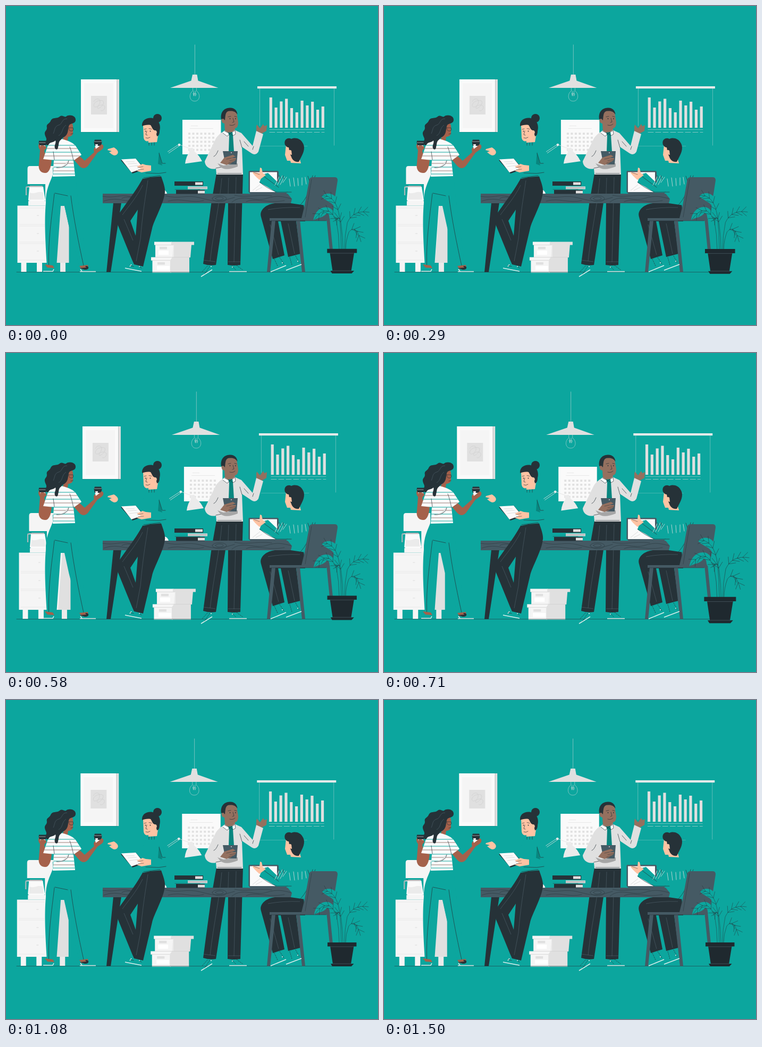
Recreate the animation shown at these times as an HTML page. Size 700x600 px, loop 1540 ms.

```html
<!DOCTYPE html>
<html lang="en">
<head>
<meta charset="utf-8">
<title>Office scene</title>
<style>
  html, body { margin: 0; width: 100%; height: 100%; overflow: hidden; background: #0ca69e; }
  svg { display: block; width: 100vw; height: 100vh; }
  .teal { fill: #0ca69e; }
  .deep { fill: #08867f; }
  .ink { fill: #263238; }
  .slate { fill: #455a64; }
  .snow { fill: #fafafa; }
  .pale { fill: #f5f5f5; }
  .mist { fill: #ebebeb; }
  .ash { fill: #e0e0e0; }
  .brown { fill: #a5614b; }
  .umber { fill: #94705f; }
  .peach { fill: #ffc3a3; }
  .ln { fill: none; stroke: #263238; stroke-width: .7; stroke-linecap: round; stroke-linejoin: round; }
  .lt { fill: none; stroke: #e0e0e0; stroke-width: .8; stroke-linecap: round; }
  .gr { fill: none; stroke: #cfcfcf; stroke-width: .7; }
  .seam { fill: none; stroke: #52646d; stroke-width: .6; }
  .sole { fill: none; stroke: #d9eeec; stroke-width: 1.500; }
  .soft { stroke-width: .5; }
</style>
</head>
<body>
<svg viewBox="0 0 700 600" xmlns="http://www.w3.org/2000/svg">
  <defs>
    <clipPath id="shirt"><path id="tee" d="M82 253C88 249 96 251 104 250C117 253 126 257 131 263L142 280L127 291L130 320L88 321L90 290L70 288Z"/></clipPath>
  </defs>

  <g id="room">
    <!-- picture -->
    <path class="ash" d="M207 138H213V237H207Z"/>
    <path class="snow" d="M141 138H208V237H141Z"/>
    <path class="pale" d="M147 145H202V230H147Z"/>
    <path class="ln soft" stroke-opacity=".35" d="M141 237.4H210M209 138V237"/>
    <path class="ash" d="M160 169H190V204H160Z"/>
    <path class="gr" d="M165 180C168 173 177 173 177 180C177 188 166 194 165 187C165 180 178 175 183 179C187 185 172 197 172 191C173 186 183 184 186 189C187 195 180 199 178 196"/>

    <!-- ceiling lamp -->
    <path class="lt" stroke-opacity=".65" d="M355.400 73V130"/>
    <path class="ash" d="M351 129H359.500L361.500 140.500L399.500 154H309L348.500 140.500Z"/>
    <path class="lt soft" d="M351.500 154V160C344 164 344 179 355 179C366 179 366 164 358.500 160V154M353.500 169L352 164C355 161 356 168 354 168C351 165 358 162 358 166L356.500 169M353.500 169V160M356.500 169V160"/>

    <!-- calendar -->
    <path class="snow" d="M332 214H404.500V279H332Z"/>
    <path class="gr" stroke-opacity=".6" d="M348 225.500H361M346 230.500H390"/>
    <g id="days" class="ash"></g>

    <!-- projector screen -->
    <path class="lt" stroke-opacity=".5" d="M477.500 155V225M617.500 155V262"/>
    <path class="lt soft" stroke-opacity=".5" d="M477.500 263.500H567"/>
    <path class="mist" d="M473 151H622V155.200H473Z"/>
    <g id="bars" class="ash"></g>
    <path class="lt" stroke-opacity=".55" d="M496 232.500H599"/>
    <path class="lt" stroke-opacity=".7" stroke-dasharray="10 4" d="M496 237.500H599"/>

    <!-- cabinet and coffee machine -->
    <path class="pale" d="M21.500 375.500H104V483H21.500Z"/>
    <path class="ash" d="M103 375.500H110L118.500 414V483H95Z"/>
    <path class="pale" d="M28.500 483H38.500V500H28.500ZM58 483H68V500H58Z"/>
    <path class="mist" d="M102 483H112V500H102Z"/>
    <path class="gr" stroke-opacity=".5" d="M25 380H73M25 411H73M25 414H73M25 444H73M25 447H73M25 478H73"/>
    <path class="gr" d="M58 394H62M58 428H62M58 461H62"/>
    <path class="pale" d="M45 301H91V335H40.500V306Q40.500 301 45 301Z"/>
    <path class="pale" d="M74 334H88V376H74ZM42 367H76V375.500H42Z"/>
    <path class="snow" d="M44 340H70L74 365Q74 367 71 367H45Q42 367 42 364Z"/>
    <path class="mist" d="M45 351C54 355 61 347 70 351L71 364H44Z"/>
    <path class="ash" d="M45 338H69V341H45Z"/>
    <path fill="none" stroke="#e8e8e8" stroke-width="2" d="M46 340H40Q38 340 38 343V356"/>
    <path class="ln soft" d="M38 356V342Q38 339 42 339H69"/>

    <!-- storage boxes -->
    <path class="mist" d="M281 449H317V473H281Z"/>
    <path class="ash" d="M316 449H349L347 473H316Z"/>
    <path class="pale" d="M279 443.500H312V449H279Z"/>
    <path class="ash" d="M311 443.500H354V449.500H311Z"/>
    <path class="pale" d="M275.500 478H311V501.500H275.500ZM281.500 449H315L313 472H281.500Z"/>
    <path class="ash" d="M309 472.500H345V501.500H309Z"/>
    <path class="pale" d="M273 472.500H313L309 478.500H273Z"/>
    <path class="ash" d="M289 453H303V457.500H289ZM285 482H299V486.500H285Z"/>
    <path fill="#fff" d="M287 460H306V468H287ZM284 489H308V496.500H284Z"/>
    <path class="gr" d="M279 449.500H315M273 478.500H309M281 472.500H345"/>

    <!-- desk lamp -->
    <path class="lt" d="M304.500 274L325 260.500M306.500 276.500L327 262.500M327 261L348 269"/>
    <circle class="mist" cx="326" cy="261" r="2.300"/>
    <path class="mist" d="M344 268L351 266.500L355 274Q363 280 369 292L337 296.500Q339 282 345 276Z"/>
    <path class="pale" d="M282 353C284 342 301 342 303 353Z"/>
  </g>

  <path class="ln" stroke-opacity=".8" d="M20 500.500H624"/>

  <!-- standing man -->
  <g>
    <path class="ink" d="M396 315H446L441 487Q429 489 417 487L418 370H413L395 487Q382 489 371 485L387 366Z"/>
    <path class="seam" d="M406 324C402 373 390 425 384 480M433 322L429 482M372 478L394 481M418 481H441M419 323L418 353"/>
    <path class="umber" d="M471 227L472 223L478 230L484 222L486 226L491 224L490 235L481 240L471 243Z"/>
    <path class="ash" d="M411 235L432 234L443 239L464 263L471 235L484 241L475 274Q470 282 462 277L444 265L446 317H396L395 306C382 309 374 300 374 292L395 249Q401 240 411 235Z"/>
    <path class="ln" d="M444 266L440 252M464 270L466 264M395 305L405 303M399 272Q395 282 391 283M448 255L456 264M398 315H443"/>
    <path class="umber" d="M409 200Q422 191 434 200L437 219Q437 229 431 230L430 239L422 242L412 236L411 221Q405 220 405.500 213Z"/>
    <path class="ink" d="M405 213C403 200 410 192 421 191.500C430 191 435 197 435.500 204C432 199 428 197 422 197.500C413 197 413 204 412 215L409 212Z"/>
    <path class="ln" d="M418 208.500L423 207.500M430 207.500L434 208.500M427 211L429 218L426 219M421 224Q427 226 431 222"/>
    <circle class="ink" cx="421.500" cy="212" r=".9"/><circle class="ink" cx="432" cy="212" r=".9"/>
    <path class="snow" d="M411 234L421 240L416 246L407 239ZM431 233L433 241L428 244L422 239Z"/>
    <path class="deep" d="M418 238L426 237L427 243L429 274L424 281L419 275L420 244Z"/>
    <path class="ln" d="M411 235L421 240L431 234L432 241L427 244L422 240L416 245L408 239"/>
    <path fill="#a6a6a6" d="M398 296L409 300L436 296V302Q411 312 402 301Z"/>
    <path class="slate" d="M408 273H436L434 298H413Z"/>
    <circle class="ash" cx="424" cy="276" r=".9"/>
    <path class="umber" d="M403 295L411 285L427 280L432 283L424 286L433 286L432 290L423 296L415 299Z"/>
    <path class="ln soft" d="M424 286L415 288M432 289L421 291M427 293L419 295"/>
    <path class="sole" d="M367 509L388 496M420 499.500H453"/>
    <path class="ln" stroke-dasharray="2 2" d="M379 489L369 500M383 490L374 504M425 489L433 497M434 488L445 496"/>
    <circle class="ash" cx="386" cy="490" r="1"/><circle class="ash" cx="426" cy="491" r="1"/>
  </g>

  <!-- table -->
  <path class="ink" d="M202 370H217L197 500.500H189Z"/>
  <path class="slate" d="M182 353H530L539 364L536 371H182Z"/>
  <path class="ln" stroke-opacity=".75" d="M182 358C205 362 215 354 233 358S260 367 275 363M184 367C210 358 220 369 246 367M218 362C226 357 240 360 246 363M300 357C326 364 340 354 366 361S400 369 430 360M305 367C330 360 348 372 372 366M388 362C390 355 413 355 415 362C415 370 389 370 388 362M394 362C396 358 408 358 409 362C408 366 395 366 394 362M425 369C445 352 468 369 490 362S520 359 536 362M452 368C470 360 490 372 524 366M430 356C450 361 470 354 500 357"/>

  <!-- books -->
  <path class="ink" d="M317 330H371V338H317ZM320 346H374V353.500H320Z"/>
  <path class="ash" d="M356 331.500H370V336.500H356ZM342 339.500H379V344.500H342ZM361 347.500H374V352.500H361Z"/>
  <path class="ln soft" d="M318 345H365M342 342H378"/>

  <!-- laptop -->
  <path class="slate" d="M458 310H510Q513 310 513 313V350H528V353H460L456.500 350V312Q456.500 310 458 310Z"/>
  <path class="snow" d="M459 312.500H510V350H459Z"/>
  <path class="gr" d="M464 347L478 336M470 347L482 341"/>

  <!-- woman with two coffees -->
  <g>
    <path class="teal" d="M88 304L131 317L133 345L152 488L138 490L118.500 415L110 376H103L95 490H77C74 440 72 405 75 370C74 347 83 331 88 318Z"/>
    <path class="ln" d="M91 353C86 397 79 440 80.500 489M122 357C127 398 137 448 146 488M92 352L116 357"/>
    <path class="brown" d="M73 486L88 488L91 493L78 492ZM138 489L154 487L155 493L142 495Z"/>
    <path class="ink" d="M149 489C158 488 157 497 148 496L139 493L151 492Z"/>
    <path class="sole" d="M70 499H88L90 495M139 499.500H169M140 495L143 499"/>

    <path class="brown" d="M73 277L86 288C85 306 80 315 73 314C64 314 60 305 62 296L64 271C60 266 60 259 64 257L73 260L76 267L72 272Z"/>
    <path class="ink" d="M62 253.500H75L76 257L75 262H63L61.500 257Z"/>
    <path class="ash" d="M64 262H74L73 269L70 265L64 266Z"/>
    <path class="brown" d="M64 264C68 259 73 263 76 266L72 272L65 270Z"/>
    <path class="brown" d="M125 286L136 280L148 291L166 275C163 268 168 263 174 265L180 261C185 262 184 268 179 271L172 276L154 301Q146 309 138 301Z"/>
    <path class="snow" d="M167 261H179L177 269H169Z"/>
    <path class="ink" d="M167 251.500H179L180.500 256L179 263H167L165.500 256Z"/>
    <path class="snow" d="M168 260H173L172 265H169Z"/>
    <path class="brown" d="M173 266L180 260C186 262 183 269 177 272L170 276L166 271Z"/>
    <path class="gr" d="M166 255H180M62 257H75"/>

    <path class="brown" d="M106 252L114 236L117 219C125 217 127 224 126 231L126 238C126 244 121 246 117 246L116 253Q111 258 106 254Z"/>
    <path class="ln" d="M117 229H126Q128 234 124 235Q118 236 118 229M122 241L126 240"/>

    <use href="#tee" class="snow"/>
    <g clip-path="url(#shirt)" fill="none" stroke-width="1">
      <path stroke="#0ca69e" d="M66 262H146M66 275H146M66 290H146M66 303H146M66 316H146"/>
      <path stroke="#9b7f78" d="M66 268H146M66 282H146M66 296H146M66 310H146"/>
    </g>
    <path class="ash" d="M94 305C107 305 116 300 119 291C112 291 114 299 104 302Z"/>
    <path class="ln" d="M91 289L89 274M120 265Q124 275 127 291M95 304C108 305 117 299 118 291"/>
    <path class="ink" d="M113 208C119 203 132 206 131 215C130 222 122 220 119 224C116 230 118 236 114 242C111 247 107 246 104 251C98 255 100 260 98 265C98 271 93 271 92 267C90 262 95 258 93 253C88 258 83 255 80 261C77 264 73 260 75 254C78 249 74 247 73 241C72 235 77 235 77 229C75 221 82 222 84 216C88 208 95 213 101 208C106 204 110 210 113 208Z"/>
    <path class="seam" d="M115 212C104 212 107 222 99 224S92 234 89 240M113 224C104 230 108 239 99 244"/>
  </g>

  <!-- woman with notes -->
  <g>
    <path class="ink" fill-rule="evenodd" d="M258 323L292 320.500C296 332 300 342 299 351C297 371 278 404 275 418L258 490L241 486L237 477L208 406Q206 400 211 393C227 369 243 351 258 323ZM248 383L234 404L244 432Z"/>
    <path class="seam" d="M267 328C263 356 257 389 253 438L245 480M257 337C246 360 228 380 219 393M222 401L239 441"/>
    <path class="teal" d="M265 258L282 255C293 256 299 270 297 300L302 314L290 318L258 325L251 314L245 291L254 282Z"/>
    <path class="deep" d="M288 274L294 300L286 297Z"/>
    <path class="ln" d="M288 277L294 296H300M263 314L287 315L301 313M259 323L290 319M269 257V262M274 257V262M279 256V262"/>
    <path class="peach" d="M258 224L276 218L287 238L284 256L268 257L268 254Q261 256 259 248Z"/>
    <circle class="ink" cx="285" cy="211" r="8"/>
    <path class="ink" d="M256 226C255 214 266 209 276 211C288 213 292 225 289 235C289 241 287 245 284 245L281 234C276 234 275 228 272 224C267 223 260 224 256 226Z"/>
    <path class="peach" d="M279 236C282 230 287 239 281 242Z"/>
    <path class="ln" d="M260 232L264 231M269 230.500L274 231.500M265 235L263 242L266 243M263 248Q267 250 271 247"/>
    <circle class="ink" cx="262.500" cy="235.500" r=".9"/><circle class="ink" cx="271.500" cy="235.500" r=".9"/>
    <path class="peach" d="M192 269L203 266C210 270 213 275 209 279C203 284 198 278 194 275L199 273L191 271Z"/>
    <path class="ink" d="M216 290L244 287L262 307L238 315Z"/>
    <path class="snow" d="M217 288.500L244 287L259 305L236 313Z"/>
    <path class="gr" d="M226 293H242M229 297L246 296M232 302L249 300"/>
    <path class="peach" d="M246 302L257 297L263 299L273 300V310L255 313L246 310L254 306Z"/>
    <path class="ln soft" d="M248 304L258 302M249 308L259 307"/>
    <path class="sole" d="M224 493L255 499M236 486L233 490"/>
    <path class="ln" d="M234 488L240 490M250 490L255 493"/>
    <circle class="ash" cx="251" cy="490" r="1"/>
  </g>

  <!-- seated man -->
  <g>
    <path class="ink" d="M560 371H506C488 373 476 385 480 397L502 476L524 469L512 405H517L531 472L554 466L546 405H563Z"/>
    <path class="seam" d="M493 383Q520 378 553 379M497 411L513 468M531 409L543 466"/>
    <path class="peach" d="M527 261L540 264L552 285L555 296L536 295L535 291H529L525 280Z"/>
    <path class="ink" d="M525 261C522 253 529 246 537 250C546 246 555 251 558 257C563 264 561 273 557 281L551 293C544 294 539 290 537 284L534 277L532 266Q528 266 525 261Z"/>
    <path class="peach" d="M537 272C530 267 530 280 538 280Z"/>
    <path class="teal" d="M482 317L493 314L514 334L534 322L570 319L588 320L577 377L536 371L541 351H509Q494 341 477 332Z"/>
    <path class="ln" d="M477 331Q489 342 509 350L529 350M482 318L513 341M537 350L529 350M550 378Q563 366 568 352"/>
    <path class="lt" d="M506 337L514 321M511 336L520 319M516 336L524 321M521 332L528 322M533 325L535 339M541 323L543 339M549 324L550 338M557 323V337M563 322L565 335"/>
    <path class="ln" d="M514 319L517 325M521 319L523 326M568 320L572 332M577 319L575 327M582 319L580 324"/>
    <path class="peach" d="M463 312L477 314L478 304L481 305L483 314L489 318L477 327Q467 319 463 312Z"/>
    <path class="ln soft" d="M466 313L477 317"/>
    <path class="slate" d="M571 325Q573 322 577 322H619Q624 322 624 328L614 392Q612 404 603 404H496V399H556L562 375Z"/>
    <path class="slate" d="M500 403H507L497 500.500H491ZM546 403H553L563 500.500H557ZM603 399H609L615 459H609Z"/>
    <path class="ln soft" d="M575 326L563 397M499 404H602"/>
    <path class="sole" d="M498 500L527 488M527 497L556 486"/>
    <path class="ln" stroke-dasharray="2 2" d="M505 476L511 489M515 473L523 485M534 473L538 487M545 470L552 483"/>
    <circle class="ash" cx="520" cy="483" r="1"/><circle class="ash" cx="549" cy="480" r="1"/>
  </g>

  <g id="plant">
    <path class="teal" d="M595 360C604 351 620 354 624 368L628 400C622 385 618 375 610 371C604 367 598 365 595 360ZM580 404C581 390 592 378 606 380C616 382 622 395 624 410L613 405C606 400 612 392 604 391C597 400 588 398 580 404Z"/>
    <path id="fronds" class="ln soft"/>
    <path fill="#1f292f" d="M605 456H659.500V463.500H605ZM610 463H654.500L649 497H615ZM611 496H654.500L650 501H614Z"/>
    <path class="seam" d="M610 464H654M615 496H650"/>
  </g>
</svg>

<script>
  const LOOP = 1540, CYCLE = 1500, STEPS = 36;
  const byId = id => document.getElementById(id);
  const rect = (x, y, w, h) => `<path d="M${x} ${y}h${w}v${h}h${-w}Z"/>`;

  const tops = [172, 191, 179.5, 174.5, 192, 200, 178, 187, 180, 195, 189];
  byId('bars').innerHTML = tops.map((y, i) => rect(495.7 + i * 9.8, y, 5.2, 229 - y)).join('');

  let days = '';
  for (let r = 0; r < 5; r++)
    for (let c = 0; c < 7; c++)
      if (r < 4 || c < 6) days += rect(343 + c * 7.5, 238.3 + r * 7.6, 4, 3.7);
  byId('days').innerHTML = days;

  // A stem from the pot to (x, y), then an arc to its tip with needles on both sides.
  function frond(root, x, y, cx, cy, tx, ty) {
    let d = `M${root} 456Q${root} ${(y + 456) / 2} ${x} ${y}Q${cx} ${cy} ${tx} ${ty}`;
    for (let i = 1; i < 5; i++) {
      const t = i / 5, u = 1 - t;
      const px = u * u * x + 2 * u * t * cx + t * t * tx;
      const py = u * u * y + 2 * u * t * cy + t * t * ty;
      const a = Math.atan2(u * (cy - y) + t * (ty - cy), u * (cx - x) + t * (tx - cx));
      for (const side of [-.75, .75])
        d += `M${px} ${py}l${12 * Math.cos(a + side)} ${12 * Math.sin(a + side)}`;
    }
    return d;
  }
  byId('fronds').setAttribute('d', [
    [631, 628, 400, 622, 356, 595, 359],
    [627, 622, 405, 606, 368, 581, 403],
    [637, 642, 408, 653, 384, 682, 389],
    [639, 645, 425, 658, 409, 667, 443],
    [634, 631, 415, 629, 390, 620, 405]
  ].map(f => frond(...f)).join(''));

  // Stops are [progress, value] pairs joined by straight lines.
  const shake = [0, -1, 2, -4, 4, -4, 4, -4, 2, -1, 0].map((v, i) => [i / 10, v]);
  const beat = [[0, 1], [.1, 1.1], [.3, 1], [.4, 1], [.5, 1.1], [.6, 1], [1, 1]];

  function at(stops, p) {
    const i = Math.max(1, stops.findIndex(s => s[0] >= p));
    const [a, u] = stops[i - 1], [b, v] = stops[i];
    return u + (v - u) * (p - a) / (b - a);
  }

  const room = byId('room'), plant = byId('plant');
  const start = performance.now();

  function draw(now) {
    const t = Math.max(0, now - start) % LOOP;
    const step = Math.min(STEPS, Math.floor((t + 5) / (CYCLE / STEPS)));
    const p = Math.min(1, (step + 1) / STEPS);
    room.setAttribute('transform', `translate(${at(shake, p) + .25} 0)`);
    plant.setAttribute('transform', `translate(631 428) scale(${at(beat, p)}) translate(-631 -428)`);
    requestAnimationFrame(draw);
  }
  draw(start);
</script>
</body>
</html>
```
